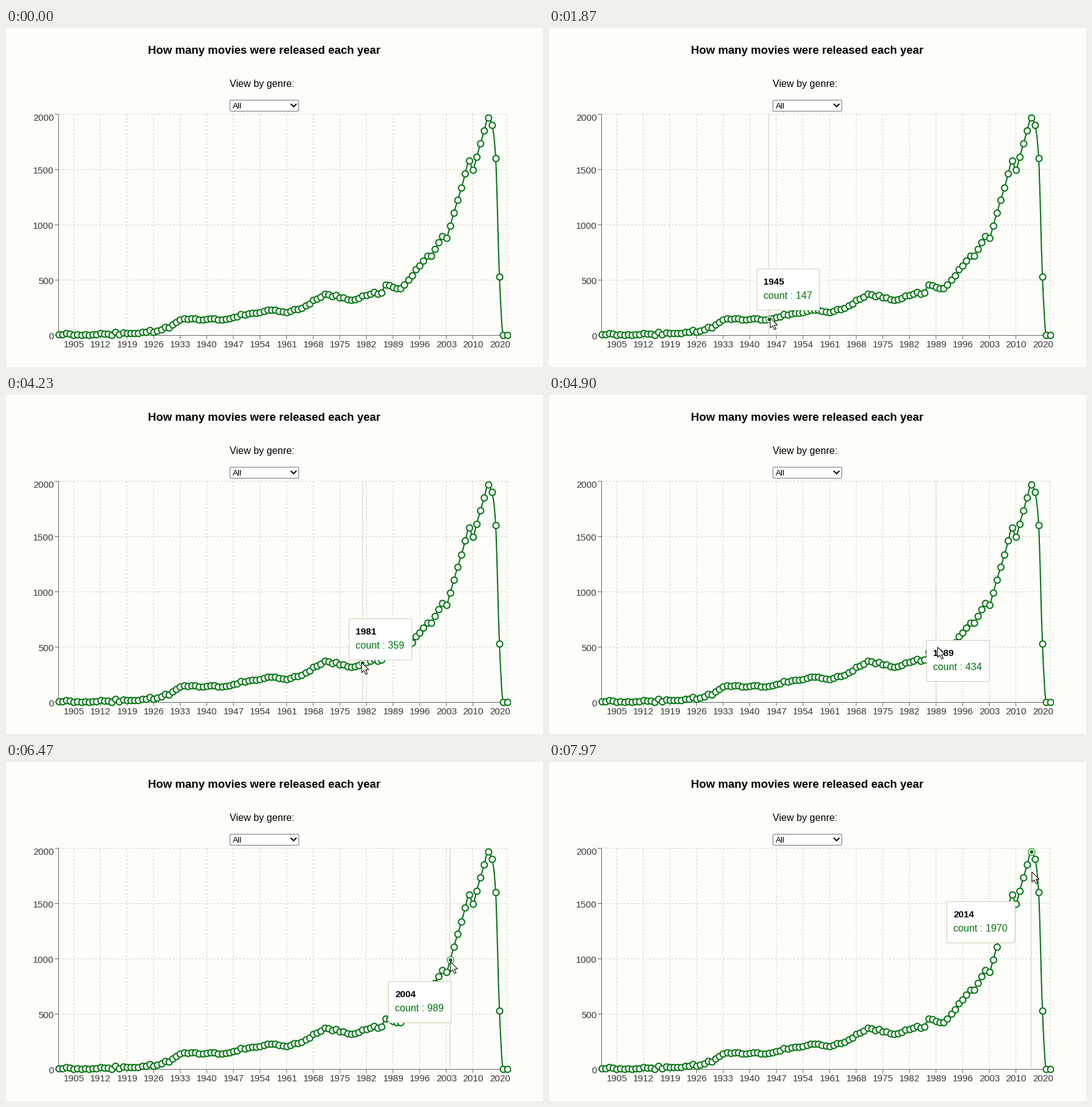
A matplotlib script for the animation above (8000 ms loop, 874 by 552 pixels).

```python
import numpy as np
import matplotlib.pyplot as plt
from matplotlib.animation import FuncAnimation
from matplotlib.patches import FancyBboxPatch, PathPatch, Polygon, Rectangle
from matplotlib.path import Path

W, H, DPI = 874, 552, 72          # at 72 dpi one point is one pixel
FRAMES, INTERVAL = 250, 32
LEFT, RIGHT, TOP, BASE = 85.5, 815.5, 140.5, 500.5
TIP_H, GAP, FOLLOW = 67, 10, 0.085
PAGE, GREEN = "#fdfdfa", "#007410"
GRID, AXIS, INK = "#d0d1bf", "#666666", "#383838"

# turning points of the yearly count; the years between are filled in
TURNS = [
    (1901, 8), (1911, 7), (1923, 28), (1927, 44), (1931, 98), (1933, 144),
    (1945, 147), (1951, 195), (1957, 230), (1961, 208), (1965, 247),
    (1971, 376), (1978, 322), (1981, 359), (1986, 388), (1987, 461),
    (1991, 424), (1994, 543), (1998, 720), (1999, 720), (2002, 899),
    (2003, 880), (2004, 989), (2007, 1335), (2009, 1583), (2010, 1497),
    (2014, 1970), (2015, 1903), (2016, 1602), (2017, 530), (2018, 5),
    (2020, 1),
]
# time, x, y of the pointer
POINTER = [
    (100, 86, 460), (1000, 290, 466), (1870, 360, 472), (3130, 481, 455),
    (4230, 578, 436), (5570, 685, 386), (6470, 723, 326), (7500, 757, 240),
    (7970, 786, 179),
]
ARROW = np.array([(0, 0), (0, 16.5), (3.8, 13), (6.6, 19.3), (9.2, 18.2),
                  (6.5, 12), (11.6, 11.7)])


def yearly_counts():
    years = np.append(np.arange(1901, 2019), 2020)
    turn_years, turn_counts = np.array(TURNS).T
    counts = np.interp(years, turn_years, turn_counts)
    wobble = np.random.default_rng(4).normal(0, 6, len(years))
    wobble[np.isin(years, turn_years)] = 0
    return years, np.maximum(np.round(counts + wobble), 1).astype(int)


YEARS, COUNTS = yearly_counts()
xs = np.linspace(LEFT, RIGHT, len(YEARS))
ys = BASE - COUNTS * (BASE - TOP) / 2000

plt.rcParams["font.family"] = "Liberation Sans"
plt.rcParams["path.snap"] = False
fig = plt.figure(figsize=((W + 0.01) / DPI, (H + 0.01) / DPI), dpi=DPI,
                 facecolor=PAGE)
ax = fig.add_axes([0, 0, 1, 1])
ax.set_xlim(0, W)
ax.set_ylim(H, 0)
ax.axis("off")


def line(x0, y0, x1, y1, color, z=1, dashed=False):
    style = (0, (3, 3)) if dashed else "-"
    return ax.plot([x0, x1], [y0, y1], color=color, lw=1, ls=style, zorder=z,
                   solid_capstyle="butt")[0]


def label(x, y, text, size, color="black", z=3, **kw):
    return ax.text(x, y, text, fontsize=size, color=color, zorder=z,
                   va="baseline", **kw)


def monotone_path(x, y):
    """Cubic curve through the points that never overshoots them."""
    h = np.diff(x)
    s = np.diff(y) / h
    p = (s[:-1] * h[1:] + s[1:] * h[:-1]) / (h[:-1] + h[1:])
    size = np.minimum(np.minimum(abs(s[:-1]), abs(s[1:])), abs(p) / 2)
    mid = (np.sign(s[:-1]) + np.sign(s[1:])) * size
    m = np.concatenate([[(3 * s[0] - mid[0]) / 2], mid,
                        [(3 * s[-1] - mid[-1]) / 2]])
    verts = [(x[0], y[0])]
    for i, d in enumerate(h / 3):
        verts += [(x[i] + d, y[i] + d * m[i]),
                  (x[i + 1] - d, y[i + 1] - d * m[i + 1]),
                  (x[i + 1], y[i + 1])]
    return Path(verts, [Path.MOVETO] + [Path.CURVE4] * (len(verts) - 1))


def draw_header():
    label(420.5, 42, "How many movies were released each year", 18.5,
          weight="bold", ha="center")
    label(364, 96, "View by genre:", 16)
    ax.add_patch(FancyBboxPatch(
        (366.5, 119.5), 108, 14, boxstyle="round,pad=2,rounding_size=2",
        fc="white", ec="#767676", lw=1))
    label(369, 131, "All", 13.33)
    ax.plot([464, 468, 472], [124.2, 128.2, 124.2], color="black", lw=2,
            solid_joinstyle="miter")


def draw_axes():
    for value in range(0, 2001, 500):
        y = BASE - value * (BASE - TOP) / 2000
        line(LEFT, y, RIGHT, y, GRID, dashed=True)
        line(LEFT - 6, y, LEFT, y, AXIS, 2)
        label(78, max(y + 6, 150.5), str(value), 15.1, INK, ha="right")
    for i in [*range(4, 110, 7), len(YEARS) - 1]:
        line(xs[i], TOP, xs[i], BASE, GRID, dashed=True)
        line(xs[i], BASE, xs[i], BASE + 6, AXIS, 2)
        label(min(xs[i] + 0.5, 804), 519.5, str(YEARS[i]), 15.1, INK,
              ha="center")
    line(LEFT, TOP, LEFT, BASE, AXIS, 2)
    line(LEFT, BASE, RIGHT, BASE, AXIS, 2)


def draw_series():
    ax.add_patch(PathPatch(monotone_path(xs, ys), fc="none", ec=GREEN, lw=2,
                           zorder=5))
    dots = ax.scatter(xs, ys, s=100, fc="white", ec=GREEN, lw=2, zorder=6)
    dots.set_clip_path(Rectangle((0, 0), RIGHT + 5, H,
                                 transform=ax.transData))


def tip_width(i):
    return round(77 + 8.5 * len(str(COUNTS[i])))


def tip_goal(i, py):
    """Right of the dot and below the pointer, flipped where it won't fit."""
    x, y = xs[i] + GAP, py + GAP
    if x + tip_width(i) > RIGHT:
        x = xs[i] - GAP - tip_width(i)
    if y + TIP_H > BASE:
        y = py - GAP - TIP_H
    return np.array([x, y])


def plan_hover():
    """Pointer, hovered point and trailing tooltip for every frame."""
    times, px, py = np.array(POINTER).T
    plan, tip = [], None
    for t in (np.arange(FRAMES) + 0.5) * INTERVAL:
        if t < times[0]:
            plan.append(None)
            continue
        x, y = np.interp(t, times, px), np.interp(t, times, py)
        i = int(np.argmin(abs(xs - x)))
        goal = tip_goal(i, y)
        tip = goal if tip is None else tip + (goal - tip) * FOLLOW
        plan.append((x, y, i, tip))
    return plan


draw_header()
draw_axes()
draw_series()

guide = line(LEFT, TOP, LEFT, BASE, "#d0d0bc", 4)
active = ax.scatter([0], [0], s=64, fc=GREEN, ec="white", lw=2, zorder=7)
box = Rectangle((0, 0), 102, TIP_H, fc="white", ec="#cfcfbc", lw=1, zorder=8)
ax.add_patch(box)
tip_year = label(0, 0, "", 15.1, z=9, weight="bold")
tip_count = label(0, 0, "", 16, GREEN, z=9)
arrow = Polygon(ARROW, closed=True, fc="white", ec="black", lw=1, zorder=10)
ax.add_patch(arrow)
HOVER = [guide, active, box, tip_year, tip_count, arrow]
PLAN = plan_hover()


def update(frame):
    state = PLAN[frame]
    for item in HOVER:
        item.set_visible(state is not None)
    if state is None:
        return HOVER
    px, py, i, tip = state
    guide.set_xdata([xs[i], xs[i]])
    active.set_offsets([(xs[i], ys[i])])
    arrow.set_xy(ARROW + (px, py))

    bx, by = np.floor(tip) + 0.5
    box.set_xy((bx, by))
    box.set_width(tip_width(i))
    tip_year.set_position((bx + 10.5, by + 25.5))
    tip_year.set_text(str(YEARS[i]))
    tip_count.set_position((bx + 10.5, by + 48.5))
    tip_count.set_text(f"count : {COUNTS[i]}")
    return HOVER


anim = FuncAnimation(fig, update, frames=FRAMES, interval=INTERVAL,
                     init_func=lambda: update(0), repeat=True, repeat_delay=0)
plt.show()
```
